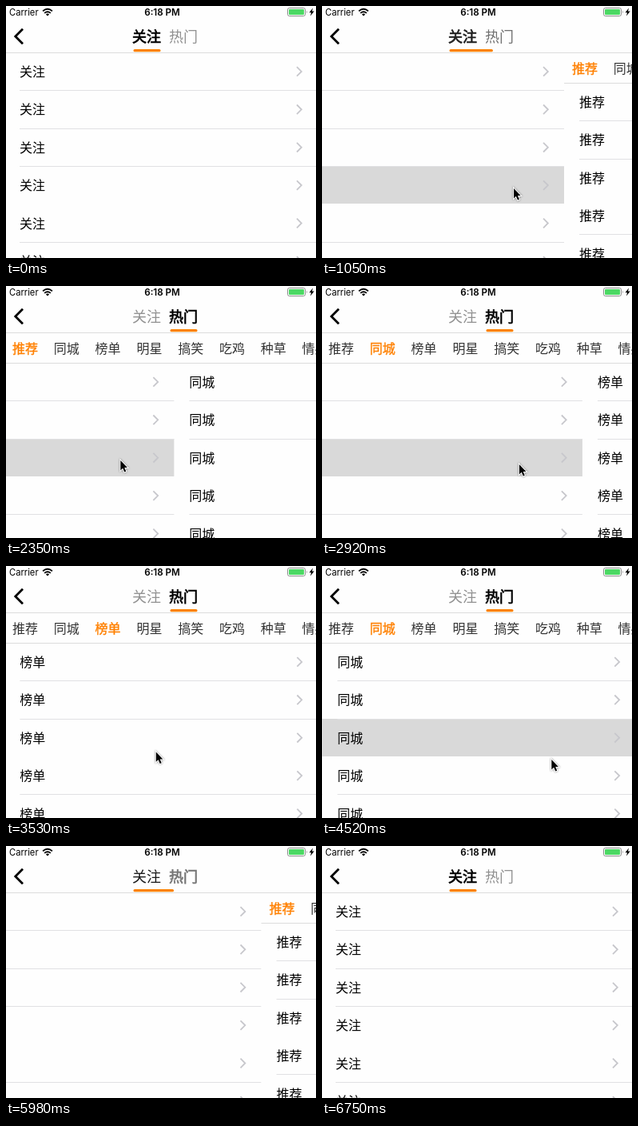
An HTML page for the animation above (7410 ms loop, 388 by 315 pixels).

```html
<!DOCTYPE html>
<html lang="zh-CN">
<head>
<meta charset="utf-8">
<title>分页滑动</title>
<style>
  html, body { margin: 0; width: 100%; height: 100%; overflow: hidden; background: #fefefe; }
  svg { display: block; }
  text { font: 16px "Noto Sans CJK SC", "Noto Sans CJK", sans-serif; }
  .status { font: 11.2px Inter, sans-serif; }
  .clock { font: 600 11.6px Inter, sans-serif; text-anchor: middle; }
  .title { font-size: 18px; }
  .title, .tab { fill: currentColor; stroke: currentColor; stroke-width: 0; }
  .title.strong { stroke-width: .7; }
  .tab { color: #333; }
  .tab.strong { color: #ff8000; stroke-width: .4; }
  .chevron { fill: none; stroke: #c7c7cc; stroke-width: 1.8; }
  .line { fill: #e1e1e3; }
  .bg { fill: #fefefe; }
  #cursor { stroke: #fff; stroke-width: 2; paint-order: stroke; filter: drop-shadow(0 .6px .8px #0007); }
</style>
</head>
<body>
<svg width="388" height="315" viewBox="0 0 388 315">
  <rect class="bg" width="388" height="315"/>
  <g id="follow"></g>
  <g id="hot">
    <rect class="bg" x="-2" y="58" width="392" height="257"/>
    <g id="lists"></g>
    <rect class="bg" x="-2" y="58" width="392" height="38"/>
    <g id="tabs"></g>
    <rect x="-2" y="96" width="392" height="1" fill="#dcdcdc"/>
  </g>
  <rect class="bg" width="388" height="58"/>
  <rect y="58" width="388" height="1" fill="#dcdcdc"/>
  <text class="status" x="4" y="12">Carrier</text>
  <g fill="none" stroke="#000" stroke-width="1.8">
    <path d="M46.1 6.4Q52 1 57.9 6.4M48.2 8.9Q52 5.5 55.8 8.9"/>
    <path d="M52 12.6L49.9 10.4Q52 8.6 54.1 10.4Z" fill="#000" stroke="none"/>
  </g>
  <text class="clock" x="195.5" y="12">6:18 PM</text>
  <rect x="352.5" y="2.5" width="22" height="10" rx="2.2" fill="none" stroke="#8b8b8b"/>
  <rect x="354" y="4" width="19" height="7" rx="1" fill="#4cd964"/>
  <path d="M376 5.7Q377.8 7.5 376 9.3Z" fill="#8b8b8b"/>
  <path d="M384 2.5L379.5 8.3H382L381 12.5L385.7 6.6H383Z"/>
  <path d="M21 28.8L11.8 38L21 47.2" fill="none" stroke="#000" stroke-width="2.8"/>
  <text class="title" x="158" y="44.5">关注</text>
  <text class="title" x="204" y="44.5">热门</text>
  <rect id="bar" y="54" height="3.3" rx="1.6" fill="#fb8200"/>
  <path id="cursor" d="M1 1V13.4L3.8 10.8L5.9 15.6L7.9 14.7L5.9 10H9.6Z"/>
</svg>
<script>
const LOOP = 7410, PAGE = 392, ROW = 47.4;
const REACH = 212, DRAG = 367, SETTLE = 450;
const SHOWN = 530, HIDDEN = 6740;
const $ = id => document.getElementById(id);
const clamp = u => Math.max(0, Math.min(u, 1));
const mix = (a, b, u) => a + (b - a) * u;

function add(parent, tag, attrs, text = '') {
  const el = document.createElementNS('http://www.w3.org/2000/svg', tag);
  for (const key in attrs) el.setAttribute(key, attrs[key]);
  el.textContent = text;
  return parent.appendChild(el);
}

// Builds a list and returns the highlight of its pressable row.
function addList(parent, label, x, top, pressedRow) {
  const list = add(parent, 'g', { transform: `translate(${x})` });
  const edge = i => Math.floor(top + ROW * i);
  const mark = add(list, 'rect', {
    x: -2, y: edge(pressedRow), width: PAGE, fill: '#d9d9d9',
    height: edge(pressedRow + 1) - edge(pressedRow)
  });
  for (let i = 0; i < 6; i++) {
    const mid = top + ROW * (i + 0.5);
    add(list, 'text', { x: 17, y: mid + 6 }, label);
    add(list, 'path', { class: 'chevron', d: `M364 ${mid - 5.8}l5.8 5.8l-5.8 5.8` });
    if (i !== pressedRow) {
      add(list, 'rect', { class: 'line', x: 17, y: edge(i + 1), width: 373, height: 1 });
    }
  }
  return mark;
}

const tabNames = ['推荐', '同城', '榜单', '明星', '搞笑', '吃鸡', '种草', '情感'];
const tabs = tabNames.map((name, i) =>
  add($('tabs'), 'text', { class: 'tab', x: 8 + i * 51.8, y: 84 }, name));
const marks = [
  addList($('follow'), '关注', 0, 58.2, 3),
  ...tabNames.slice(0, 3).map((name, i) => addList($('lists'), name, i * PAGE, 96.2, 2))
];
const titles = document.querySelectorAll('.title');

// Three swipes forward and three back; x and y are where the pointer presses.
const swipes = [
  { press: 800, x: 326, y: 227, drag: 612 },
  { press: 2040, x: 322, y: 217 },
  { press: 2810, x: 310, y: 222 },
  { press: 3560, x: 192, y: 232 },
  { press: 4517, x: 284, y: 241 },
  { press: 5520, x: 213, y: 221 }
].map((s, i) => ({ drag: DRAG, ...s, from: i < 3 ? i : 6 - i, step: i < 3 ? 1 : -1 }));
const exit = { x: 383, y: 309 };

// Pointer and scroll position (in pages), the settled page and the pressed page.
function stateAt(t) {
  const index = swipes.findLastIndex(s => s.press <= t);
  if (index < 0) {
    const { x, y } = swipes[0];
    return { x, y: mix(y + 25, y, clamp((t - SHOWN) / 90)), pos: 0, page: 0, pressed: -1 };
  }
  const { press, drag, x, y, from, step } = swipes[index];
  const dragged = clamp((t - press) / drag) * REACH;
  const settled = clamp((t - press - drag) / SETTLE);
  const next = swipes[index + 1] || exit;
  const back = Math.sin(settled * Math.PI / 2);
  const left = (1 - dragged / PAGE) * (1 - settled) ** 4;
  return {
    x: mix(x - step * dragged, next.x, back),
    y: mix(y, next.y, back),
    pos: from + step * (1 - left),
    page: settled < 1 ? from : from + step,
    pressed: dragged < REACH ? from : -1
  };
}

function draw(t) {
  const { x, y, pos, page, pressed } = stateAt(t);
  const outer = clamp(pos);
  const inner = Math.max(pos, 1) - 1;
  const shift = (id, dx, dy = 0) => $(id).setAttribute('transform', `translate(${dx} ${dy})`);
  const show = (el, on) => el.setAttribute('visibility', on ? 'visible' : 'hidden');

  shift('follow', -outer * PAGE);
  shift('hot', (1 - outer) * PAGE);
  shift('lists', -inner * PAGE);
  marks.forEach((mark, i) => show(mark, i === pressed));
  tabs.forEach((tab, i) => tab.classList.toggle('strong', i === Math.round(inner)));

  titles.forEach((title, i) => {
    const gray = Math.round(145 * Math.abs(outer - i));
    title.style.color = `rgb(${gray},${gray},${gray})`;
    title.classList.toggle('strong', Math.min(page, 1) === i);
  });

  // The underline stretches to the far title, then its tail catches up.
  const barLeft = 159.5 + 46 * clamp(outer * 2 - 1);
  const barRight = 193.5 + 46 * clamp(outer * 2);
  $('bar').setAttribute('x', barLeft);
  $('bar').setAttribute('width', barRight - barLeft);

  show($('cursor'), t >= SHOWN && t < HIDDEN);
  shift('cursor', x, y);
}

const start = performance.now();
function tick() {
  draw((performance.now() - start) % LOOP);
  requestAnimationFrame(tick);
}
tick();
</script>
</body>
</html>
```
